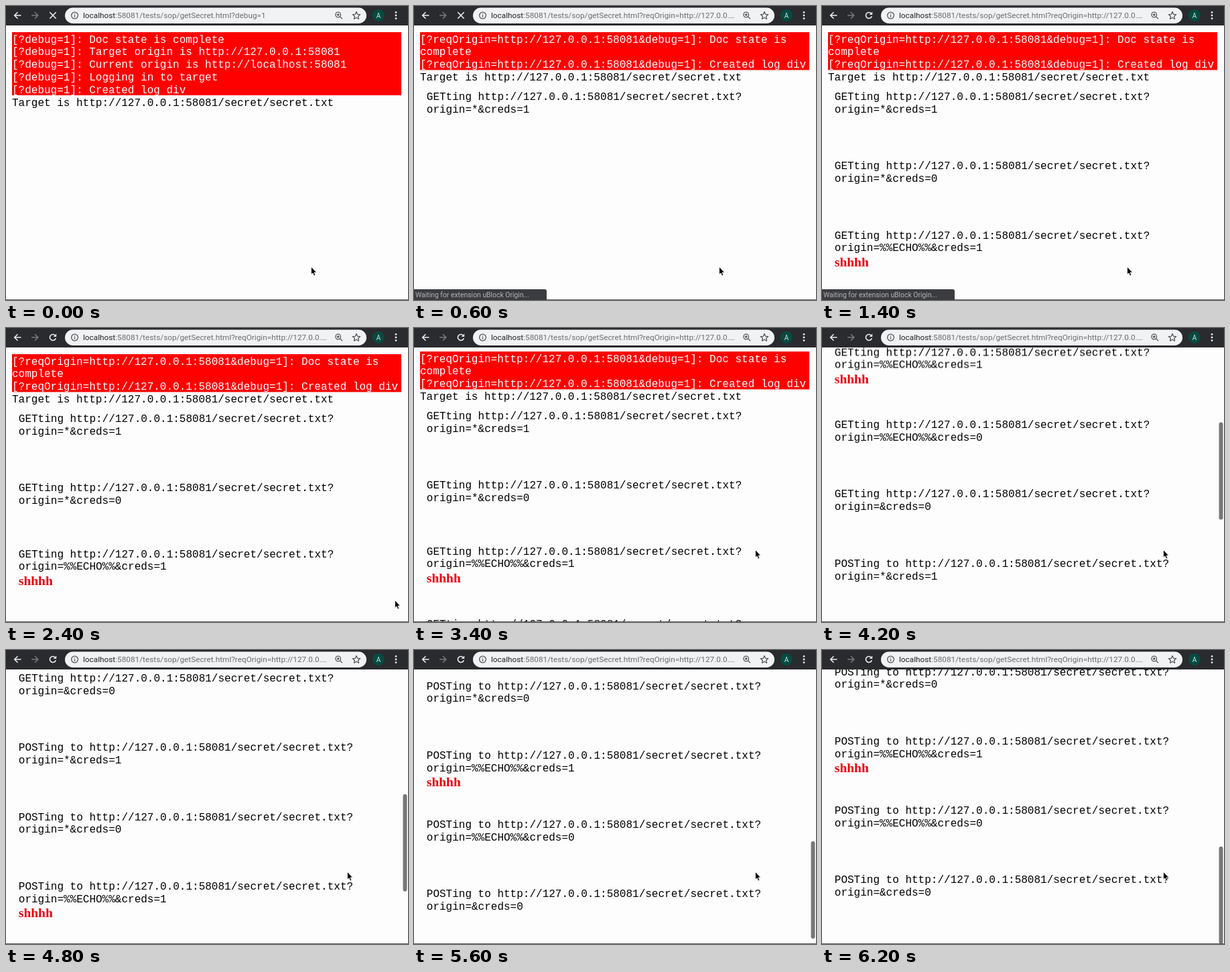
Animation, 600 px wide and 438 px high, one loop 6.4 s. Source, as an HTML page:

```html
<!DOCTYPE html>
<html lang="en">
<head>
<meta charset="utf-8">
<title>Secret test page</title>
<style>
  @property --scroll { syntax: "<number>"; inherits: true; initial-value: 0; }

  html, body { margin: 0; width: 100%; height: 100%; overflow: hidden; background: #fefdfe; }
  svg { display: block; width: 600px; height: 438px; }
  text { white-space: pre; }

  .mono text { font: 16px "Liberation Mono", monospace; }
  .mono .secret { font: bold 19.5px "Liberation Serif", serif; fill: #ea0006; }
  .log { fill: #fff; }
  .ui { font: 11.8px Roboto, sans-serif; fill: #6b6d71; }
  .host { fill: #202124; }
  .line { fill: none; stroke: #eceef0; stroke-width: 1.6; }
  .dark { fill: none; stroke: #55585c; stroke-width: 1.3; }

  /* Every animation shares one 6.4 s clock; one step is 200 ms = 3.125 %. */
  .stage, .anim { animation: 6.4s step-end infinite; }
  .stage { animation-name: scroll; }
  .page { transform: translateY(calc(var(--scroll) * -1px)); }
  .thumb { transform: translateY(calc(var(--scroll) * .361px)); }
  .bar { animation-name: bar; }
  .old { animation-name: old; }
  .boot { animation-name: boot; }
  .new { animation-name: new; }
  .at600 { animation-name: at600; }
  .at800 { animation-name: at800; }
  .at1000 { animation-name: at1000; }
  .at1400 { animation-name: at1400; }
  .to1400 { animation-name: to1400; }
  .status { animation-name: status; }
  .shift { animation-name: shift; }
  .cursor { animation-name: cursor; }

  @keyframes old { 0% { opacity: 1 } 6.25%, 100% { opacity: 0 } }
  @keyframes new { 0% { opacity: 0 } 6.25%, 100% { opacity: 1 } }
  @keyframes boot { 0% { opacity: 0 } 6.25% { opacity: 1 } 9.375%, 100% { opacity: 0 } }
  @keyframes at600 { 0% { opacity: 0 } 9.375%, 100% { opacity: 1 } }
  @keyframes at800 { 0% { opacity: 0 } 12.5%, 100% { opacity: 1 } }
  @keyframes at1000 { 0% { opacity: 0 } 15.625%, 100% { opacity: 1 } }
  @keyframes at1400 { 0% { opacity: 0 } 21.875%, 100% { opacity: 1 } }
  @keyframes to1400 { 0% { opacity: 1 } 21.875%, 100% { opacity: 0 } }
  @keyframes bar { 0% { opacity: 0 } 56.25%, 100% { opacity: 1 } }
  @keyframes status {
    0% { opacity: 0 } 3.125% { opacity: 1 } 28.125% { opacity: .5 } 31.25%, 100% { opacity: 0 }
  }
  @keyframes shift {
    0% { transform: translateY(5px) } 37.5%, 100% { transform: translateY(0) }
  }
  @keyframes cursor {
    0% { transform: translate(455px, 388px) }
    37.5% { transform: translate(580px, 405px) }
    43.75% { transform: translate(562px, 384px) }
    46.875% { transform: translate(535px, 355px) }
    50%, 100% { transform: translate(509px, 330px) }
  }
  @keyframes scroll {
    0% { --scroll: 0 }
    53.125% { --scroll: 4 }
    56.25% { --scroll: 55 }
    59.375% { --scroll: 130 }
    62.5% { --scroll: 213 }
    65.625% { --scroll: 300.5 }
    68.75% { --scroll: 375 }
    71.875% { --scroll: 442 }
    75% { --scroll: 506 }
    78.125% { --scroll: 567 }
    81.25% { --scroll: 622 }
    84.375% { --scroll: 667 }
    87.5% { --scroll: 701 }
    90.625% { --scroll: 713 }
    93.75% { --scroll: 719 }
    96.875%, 100% { --scroll: 722 }
  }
</style>
</head>
<body>
<svg class="stage" viewBox="0 0 600 438">
  <rect width="600" height="438" fill="#fefdfe"/>
  <g class="page mono" id="page"></g>

  <g class="anim bar">
    <rect class="thumb" x="592.5" y="32" width="6" height="145" rx="3" fill="#77777a"/>
  </g>
  <rect y="437" width="600" height="1" fill="#5c5c5f"/>

  <g class="anim status">
    <path d="M0 422H195Q198 422 198 425V438H0Z" fill="#3b3c3f"/>
    <text x="2" y="434" class="ui" style="font-size:10.4px;fill:#b4b5b8">Waiting for extension uBlock Origin...</text>
  </g>

  <!-- toolbar -->
  <rect width="600" height="29" fill="#2a2b2f"/>
  <rect x="88" y="2.5" width="450" height="23.5" rx="11.75" fill="#f1f2f4"/>
  <path class="line" d="M22.5 14H13M17.5 9.2L12.7 14L17.5 18.8"/>
  <path class="line" style="stroke:#77797d" d="M38 14H47.5M43 9.2L47.8 14L43 18.8"/>
  <path class="line anim to1400" d="M65.3 9.3L74.7 18.7M74.7 9.3L65.3 18.7"/>
  <g class="anim at1400">
    <path class="line" d="M74.3 15.2A4.5 4.5 0 1 1 73.2 10.8"/>
    <path d="M75.2 8.4V13H70.6Z" fill="#eceef0"/>
  </g>
  <circle class="dark" cx="102.5" cy="14" r="4.9"/>
  <path class="dark" d="M102.5 13.4V16.7M102.5 11.2V12.4"/>
  <text class="ui anim old" x="115" y="18"><tspan class="host">localhost</tspan>:58081/tests/sop/getSecret.html?debug=1</text>
  <text class="ui anim new" x="115" y="18"><tspan class="host">localhost</tspan>:58081/tests/sop/getSecret.html?reqOrigin=http://127.0.0.…</text>
  <circle class="dark" cx="495.7" cy="13" r="3.8"/>
  <path class="dark" d="M498.6 15.9L502 19.3M493.8 13H497.6M495.7 11.1V14.9"/>
  <path class="dark" stroke-linejoin="round" d="M523 8.6L524.6 12.3L528.6 12.7L525.6 15.3L526.5 19.3L523 17.2L519.5 19.3L520.4 15.3L517.4 12.7L521.4 12.3Z"/>
  <circle cx="556" cy="14" r="9" fill="#064b42"/>
  <text x="556" y="17.6" text-anchor="middle" class="ui" style="font-size:10px;fill:#d4e2df">A</text>
  <g fill="#eceef0">
    <circle cx="582" cy="9.4" r="1.4"/><circle cx="582" cy="14" r="1.4"/><circle cx="582" cy="18.6" r="1.4"/>
  </g>

  <path class="anim cursor" d="M.5 .5V12L3 9.8L4.8 14L6.8 13.1L5 9H8.5Z" fill="#000" stroke="#fff" stroke-width=".8"/>
</svg>

<script>
  const LINE = 18.8, TOP = 39, STEP = 103.3;
  const url = "http://127.0.0.1:58081";
  const file = url + "/secret/secret.txt";
  const esc = s => s.replace(/&/g, "&amp;");
  const text = (x, y, s, cls = "") => `<text x="${x}" y="${y}" class="${cls}">${esc(s)}</text>`;
  const row = (i, s, cls) => text(9, TOP + 15.6 + i * LINE, s, cls);

  // Red log box with the plain file line below it.
  const head = (cls, lines) => `<g class="anim ${cls}">
    <rect x="9" y="${TOP}" width="581" height="${lines.length * LINE}" fill="#fe0000"/>
    ${lines.map((s, i) => row(i, s, "log")).join("")}
    ${row(lines.length, "Target is " + file)}</g>`;

  const request = (y, verb, allow, creds, cls, secretCls) => `<g class="anim ${cls}">
    ${text(18.8, y, `${verb} ${file}?`)}
    ${text(18.8, y + LINE, `origin=${allow}&creds=${creds}`)}
    ${secretCls ? text(18.8, y + 41, "shhhh", "secret " + secretCls) : ""}</g>`;

  const cases = [["*", 1], ["*", 0], ["%%ECHO%%", 1], ["%%ECHO%%", 0], ["", 0]];
  const early = ["at600", "at800", "at1000"];

  const oldTag = "[?debug=1]: ";
  const newTag = `[?reqOrigin=${url}&debug=1]: `;
  let html =
    head("old", [
      "Doc state is complete",
      "Target origin is " + url,
      "Current origin is http://localhost:58081",
      "Logging in to target",
      "Created log div"
    ].map(s => oldTag + s)) +
    head("boot", [newTag + "Created log div"]) +
    head("at600", [newTag + "Doc state is", "complete", newTag + "Created log div"]);

  ["GETting", "POSTing to"].forEach((verb, v) => cases.forEach(([allow, creds], c) => {
    const n = v * cases.length + c;
    const leaks = allow === "%%ECHO%%" && creds === 1;
    const y = n < 2 ? 140 + n * STEP : n === 2 ? 341.6 : 449.6 + (n - 3) * STEP;
    const block = request(y, verb, allow, creds, early[n] || "at1000", leaks && "anim at1400");
    html += n === 2 ? `<g class="anim shift">${block}</g>` : block;
  }));

  document.getElementById("page").innerHTML = html;
</script>
</body>
</html>
```
